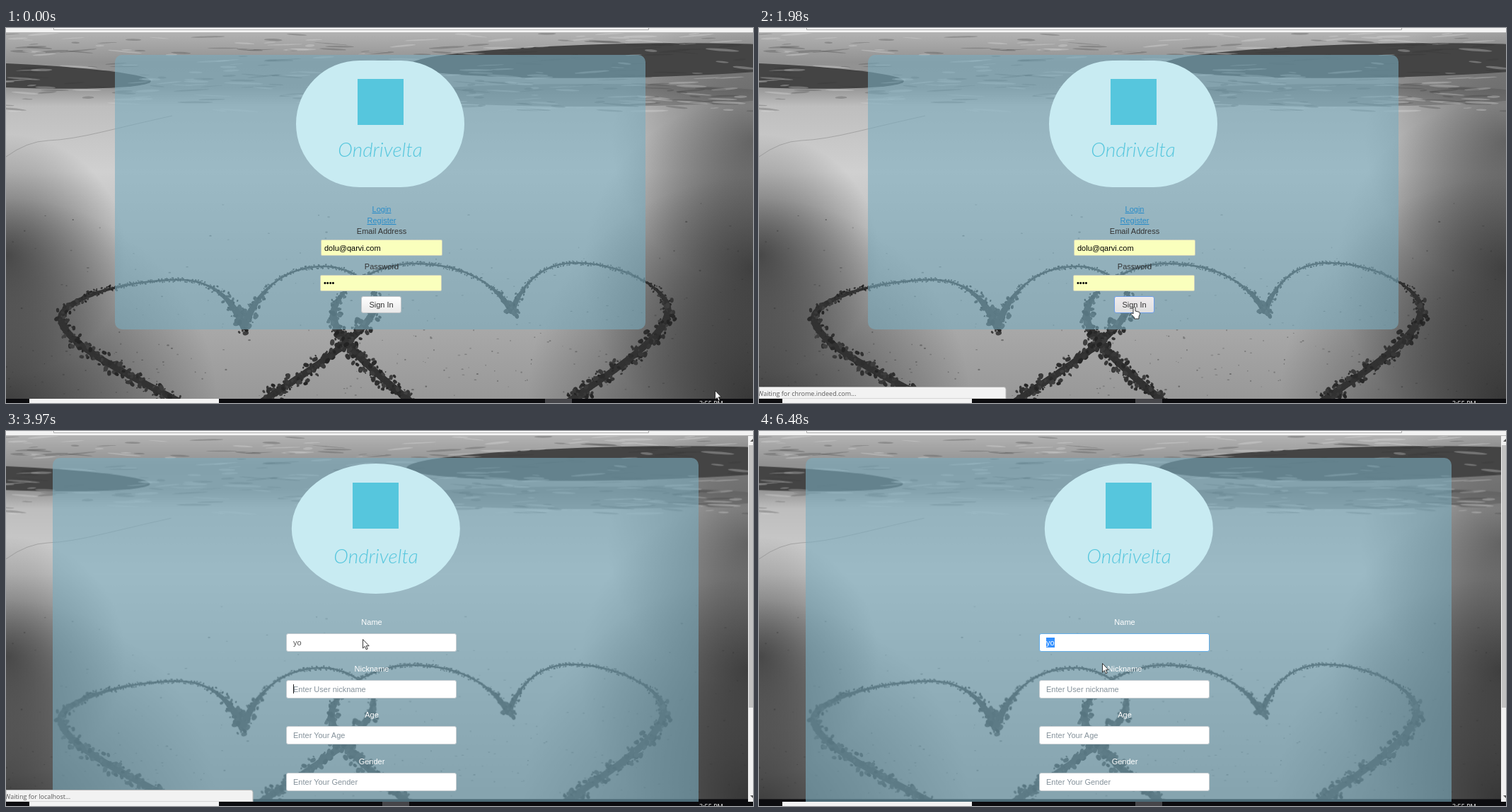
Animation of 1056 by 530 pixels, one loop 8000 ms. Source, as an HTML page with a canvas:

```html
<!DOCTYPE html>
<html lang="en">
<head>
<meta charset="utf-8">
<title>Sign in</title>
<style>
  html, body { margin: 0; width: 100%; height: 100%; overflow: hidden; background: #0c0c0f; }
  canvas, svg { position: absolute; left: 0; top: 0; }
  canvas { top: 7px; transform-origin: 0 0; }
  text { font: 11px "Liberation Sans", Arial, sans-serif; }
  .mid { text-anchor: middle; }
  .system { font: 9px "Open Sans", sans-serif; }
  .wordmark { font: italic 300 28px Lato, sans-serif; fill: #56c6dd; text-anchor: middle; }
  .panel { fill: rgba(122,172,191,.6); }
  .oval { fill: #c8ebf2; }
  .logo { fill: #56c6dd; }
  .link { fill: #2a8cc8; text-decoration: underline; }
  .label { fill: #333; }
  .filled { fill: #faffbd; stroke: #c8cdbd; }
  .hint { fill: #85929b; }
</style>
</head>
<body>
<canvas id="photo" width="1056" height="517"></canvas>
<svg width="1056" height="530">
  <defs>
    <linearGradient id="plain" x2="0" y2="1"><stop stop-color="#fff"/><stop offset="1" stop-color="#e9e9e9"/></linearGradient>
    <linearGradient id="hovered" x2="0" y2="1"><stop stop-color="#f0ecee"/><stop offset="1" stop-color="#dfdfdf"/></linearGradient>
  </defs>

  <g id="login">
    <rect class="panel" x="154" y="38" width="750" height="388" rx="10"/>
    <rect class="oval" x="410" y="46" width="238" height="179" rx="89.5"/>
    <rect class="logo" x="497" y="72" width="65" height="65"/>
    <text class="wordmark" x="529" y="182">Ondrivelta</text>
    <text class="mid link" x="531" y="260">Login</text>
    <text class="mid link" x="531" y="276">Register</text>
    <text class="mid label" x="531" y="291">Email Address</text>
    <rect class="filled" x="445.5" y="299.5" width="171" height="22" rx="1.5"/>
    <text x="450" y="315">dolu@qarvi.com</text>
    <text class="mid label" x="531" y="341">Password</text>
    <rect class="filled" x="444.5" y="349.5" width="171" height="22" rx="1.5"/>
    <text x="449" y="364">••••</text>
    <rect id="button" x="502.5" y="379.5" width="56" height="23" rx="2.5"/>
    <text class="mid label" x="530.5" y="395">Sign In</text>
  </g>

  <g id="profile">
    <rect class="panel" x="66" y="38" width="913" height="510" rx="10"/>
    <ellipse class="oval" cx="522.8" cy="138" rx="119" ry="92"/>
    <rect class="logo" x="490" y="73" width="65" height="65"/>
    <text class="wordmark" x="523" y="187">Ondrivelta</text>
    <g id="fields"></g>
    <rect id="selection" x="406" y="292" width="12" height="14" fill="#3390ff"/>
    <text id="nameValue" x="406" y="303">yo</text>
    <path id="caret" d="M406.5 358v13" stroke="#222"/>
    <path d="M1049 7h7v517h-7z" fill="#f1f1f1"/>
    <path d="M1050 20h6v371h-6z" fill="#c1c1c1"/>
    <path d="M1052 15l4-4v4zM1052 515h4v4z" fill="#555"/>
  </g>

  <g id="status">
    <path d="M0 507.5H346q3 0 3 3V524H0z" fill="#f2f2f2" stroke="#b8b8b8"/>
    <text id="statusText" class="system" x="-2" y="520" fill="#5a5a5a"></text>
  </g>

  <path d="M0 0h1056v7H0z" fill="#f2f2f2"/>
  <path d="M67.5 0v2.5h841V0" fill="#fff" stroke="#aaa"/>
  <path d="M0 6.5h1056" stroke="#b4b4b4"/>
  <path d="M0 524h1056v6H0z" fill="#0c0c0f"/>
  <path d="M33 524h268v6H33z" fill="#f3f3f3"/>
  <rect id="task" y="524" width="38" height="6" fill="#46464a"/>
  <text class="system" x="980" y="534" fill="#fff">3:55 PM</text>

  <g id="cursor" fill="#fff" stroke="#222" stroke-width=".9">
    <path id="arrow" d="M.5 .5V13L3.3 10.4 5.2 14.8 7.2 14 5.3 9.7H9.2z"/>
    <path id="hand" d="M4 2q1.5-2 3 0V7l5 1.3q1.8 .5 1.5 3L12 15v3H5.5V16L1 11.5Q.5 9 3 10l1 1z"/>
    <path id="beam" d="M.5 .5h2l1 1 1-1h2M3.500 1V13.500M.5 14h2l1-1 1 1h2" fill="none" stroke="#5b9b35"/>
  </g>
</svg>

<script>
const $ = id => document.getElementById(id);
const show = (id, on) => { $(id).style.display = on ? '' : 'none'; };
const set = (id, name, value) => $(id).setAttribute(name, value);
const gray = (v, alpha = 1) => `rgba(${v},${v},${v},${alpha})`;

let seed = 7;
const random = () => (seed = seed * 16807 % 2147483647) / 2147483647;
const between = (a, b) => a + (b - a) * random();

const ctx = $('photo').getContext('2d');

function blob(color, x, y, rx, ry, angle = 0) {
  ctx.fillStyle = color;
  ctx.beginPath();
  ctx.ellipse(x, y, rx, ry, angle, 0, 7);
  ctx.fill();
}

function shade(x, y, radius, alpha) {
  const g = ctx.createRadialGradient(x, y, 0, x, y, radius);
  g.addColorStop(0, gray(28, alpha));
  g.addColorStop(.5, gray(28, alpha * .5));
  g.addColorStop(1, gray(28, 0));
  ctx.fillStyle = g;
  ctx.fillRect(0, 0, 1056, 530);
}

// Half a heart: from the notch over the top and round the side to the foot
function halfHeart(notch, top, side, foot) {
  const mix = (a, b, u, v) => [a[0] + (b[0] - a[0]) * u, a[1] + (b[1] - a[1]) * v];
  const line = document.createElementNS('http://www.w3.org/2000/svg', 'path');
  line.setAttribute('d', `M${notch} Q${mix(notch, top, .3, 1)} ${top}
    C${mix(top, side, .5, 0)} ${mix(top, side, 1, .55)} ${side}
    C${mix(side, foot, 0, .3)} ${mix(side, foot, .6, .7)} ${foot}`);
  for (let s = 0; s < line.getTotalLength(); s += 2) {
    const { x, y } = line.getPointAtLength(s);
    const spread = Math.max(3, Math.min(10, (y - 343) / 6));
    blob(gray(50), x, y, spread * .5, spread * .45);
    for (let k = 0; k < 2; k++) {
      const r = between(.7, spread * .32);
      blob(gray(between(35, 65)), x + between(-spread, spread), y + between(-spread, spread), r * 1.4, r, random() * 3);
    }
  }
}

function paintPhoto() {
  ctx.translate(0, -7);
  const base = ctx.createLinearGradient(0, 7, 0, 524);
  [[0, 178], [.08, 145], [.15, 150], [.2, 190], [.38, 208], [.6, 186], [1, 152]]
    .forEach(([stop, v]) => base.addColorStop(stop, gray(v)));
  ctx.fillStyle = base;
  ctx.fillRect(0, 0, 1056, 530);

  shade(0, 320, 170, .65);
  shade(0, 540, 300, .75);
  shade(1056, 160, 200, .5);
  shade(1056, 340, 240, .65);
  shade(1056, 530, 320, .75);

  blob(gray(68), 0, 67, 205, 17, .04);
  blob(gray(68), 880, 46, 310, 24, -.02);
  blob(gray(80, .4), 820, 95, 270, 16);
  for (let i = 0; i < 320; i++) {
    const color = i % 2 ? gray(225, .3) : gray(50, .25);
    blob(color, between(0, 1056), between(8, 118), between(5, 28), between(.5, 1.8), between(-.1, .1));
  }
  ctx.strokeStyle = gray(100, .35);
  ctx.stroke(new Path2D('M0 182Q30 160 60 159T140 146 235 124'));

  for (let i = 0; i < 260; i++)
    blob(gray(50, between(.2, .5)), between(0, 1056), 230 + 290 * Math.sqrt(random()), between(.6, 2), between(.5, 1.2));

  const leftNotch = [336, 422], rightNotch = [715, 400];
  halfHeart(leftNotch, [245, 356], [78, 410], [245, 528]);
  halfHeart(leftNotch, [450, 337], [523, 385], [362, 528]);
  halfHeart(rightNotch, [575, 333], [463, 405], [572, 528]);
  halfHeart(rightNotch, [805, 332], [936, 398], [795, 528]);
}

function buildFields() {
  const hints = { Name: '', Nickname: 'Enter User nickname', Age: 'Enter Your Age', Gender: 'Enter Your Gender' };
  $('fields').innerHTML = Object.entries(hints).map(([label, hint], i) => {
    const y = Math.round(i * 65.5);
    return `<text class="mid" x="517" y="${274 + y}" fill="#fff">${label}</text>
      <rect id="field${label}" x="396.5" y="${286.5 + y}" width="240" height="25" rx="2.5" fill="#fff" stroke="#c5ccd0"/>
      <text class="hint" x="406" y="${303 + y}">${hint}</text>`;
  }).join('');
}

const tickAt = t => Math.floor((t + 18) / 249);
const moves = [
  [0, 1, 1002, 512], [1, 1, 572, 246], [2, 1, 537, 272], [3, 2, 524, 401], [5, 1, 525, 393], [9, 1, 643, 380],
  [15, 2, 504, 294], [17, 1, 469, 296], [18, 2, 390, 301], [20, 2, 428, 297], [22, 1, 480, 319], [24, 1, 485, 328]
];

function pointerAt(tick) {
  const i = moves.findLastIndex(move => move[0] <= tick);
  const [start, length, x, y] = moves[i];
  const [, , fromX, fromY] = moves[Math.max(0, i - 1)];
  const eased = 1 - (1 - Math.min(1, (tick - start + 1) / length)) ** 1.8;
  return [fromX + (x - fromX) * eased, fromY + (y - fromY) * eased].map(Math.round);
}

function pointerShape(tick) {
  if (tick === 3 || tick === 20 || tick === 21) return 'beam';
  return tick >= 2 && tick < 9 ? 'hand' : 'arrow';
}

function render(t) {
  const tick = tickAt(t);
  const onProfile = tick >= 12, selected = tick >= 20;
  show('login', !onProfile);
  show('profile', onProfile);
  $('photo').style.transform = onProfile ? `scale(${1049 / 1056})` : '';

  set('button', 'fill', tick >= 4 && tick < 10 ? 'url(#hovered)' : 'url(#plain)');
  set('button', 'stroke', tick >= 8 ? '#6c9de8' : '#bfc4c8');

  show('selection', selected);
  show('caret', !selected);
  set('nameValue', 'fill', selected ? '#fff' : '#555');
  set('fieldName', 'stroke', tick >= 24 ? '#66afe9' : '#c5ccd0');

  show('status', tick >= 8 && tick < 26);
  set('status', 'opacity', tick === 25 ? .5 : 1);
  $('statusText').textContent = `Waiting for ${tick < 10 ? 'chrome.indeed.com' : 'localhost'}...`;
  set('task', 'x', tick < 8 ? 762 : 532);

  const shape = pointerShape(tick);
  ['arrow', 'hand', 'beam'].forEach(id => show(id, id === shape));
  set('cursor', 'transform', `translate(${pointerAt(tick)})`);
}

function animate() {
  render(performance.now() % 8000);
  requestAnimationFrame(animate);
}

paintPhoto();
buildFields();
animate();
</script>
</body>
</html>
```
